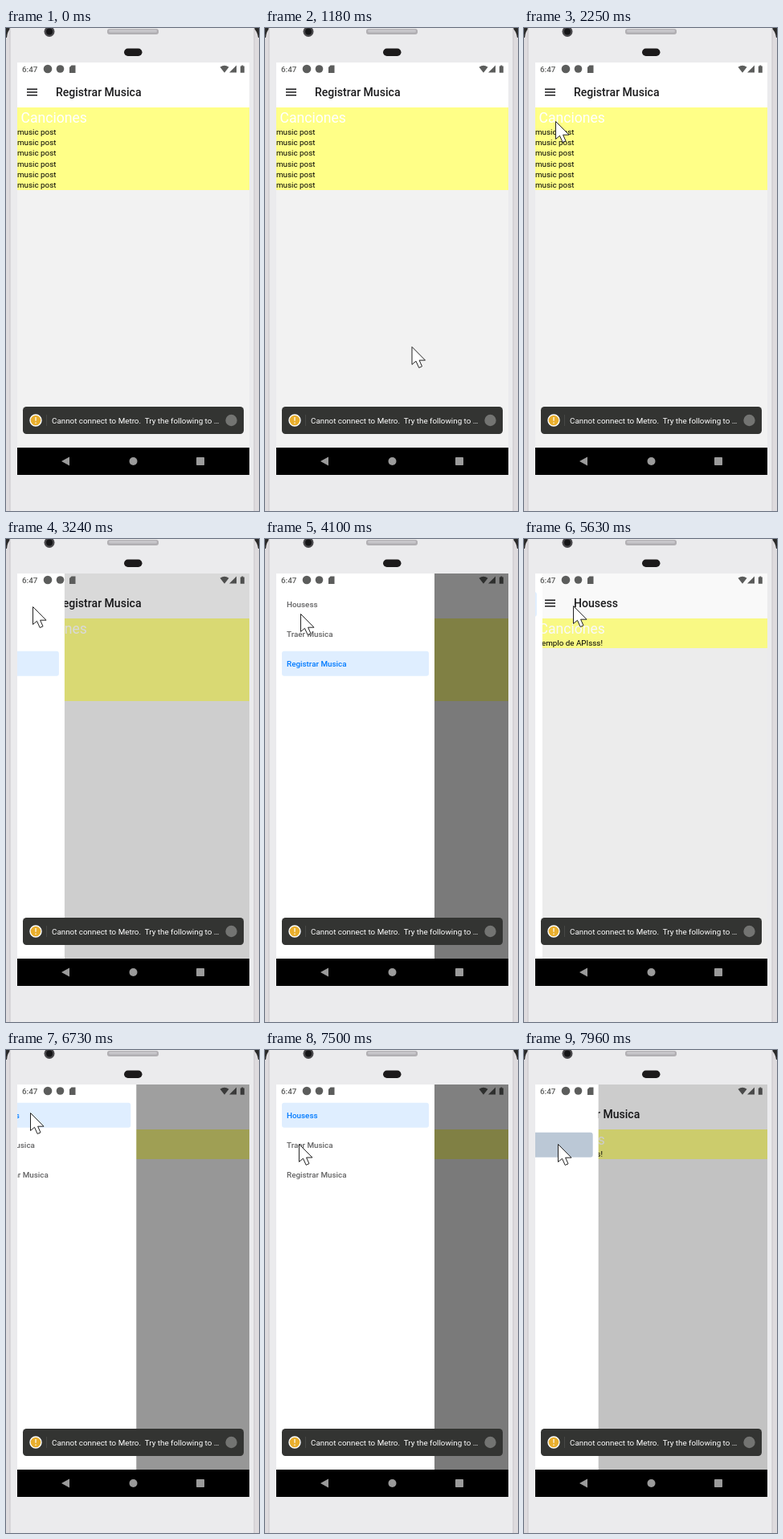
Write an HTML page that moves like this. It is 315x602 px and loops after 8 s.

```html
<!DOCTYPE html>
<html lang="es">
<head>
<meta charset="utf-8">
<title>Drawer navigation</title>
<style>
  html, body { margin: 0; width: 100%; height: 100%; overflow: hidden; background: #e9e9eb; }
  svg { display: block; width: 100%; height: 100%; }
  text { font-family: Roboto, sans-serif; font-size: 9.84px; white-space: pre; }
  .medium { font-weight: 500; }
  .title { font-size: 14.06px; }
  .heading { font-size: 17.58px; }
</style>
</head>
<body>
<svg viewBox="0 0 315 602">
  <defs>
    <clipPath id="screenClip"><rect x="14" y="43" width="289" height="480"/></clipPath>
    <clipPath id="itemClip"><rect id="itemClipRect" x="21" width="183" height="31" rx="3"/></clipPath>
  </defs>

  <!-- phone body -->
  <rect width="315" height="602" fill="#dedbde"/>
  <path d="M0 0H6Q1.500 4 1 12H0ZM315 0H308Q313 4 314 12H315Z" fill="#2a2a2a"/>
  <rect x="5" y="-8" width="304" height="618" rx="8" fill="#ebebed" stroke="#c8c5c9"/>
  <circle cx="54" cy="4.500" r="6.500" fill="#48474a"/>
  <circle cx="54" cy="4.500" r="4" fill="#151517"/>
  <rect x="126" y="1" width="64" height="7" rx="3" fill="#b1afb3"/>
  <rect x="128" y="2" width="60" height="3.500" rx="1.700" fill="#c6c5c9"/>
  <rect x="147" y="25.500" width="22.500" height="9.500" rx="4.750" fill="#1c1a1b"/>

  <g clip-path="url(#screenClip)">
    <!-- page -->
    <rect x="14" y="43" width="289" height="480" fill="#f2f2f2"/>
    <rect x="14" y="43" width="289" height="56" fill="#fff"/>
    <path d="M26 76.200h13M26 80h13M26 83.800h13" stroke="#1c1c1e" stroke-width="1.400"/>
    <text id="title" class="medium title" x="62" y="85" fill="#1c1c1e"></text>
    <rect id="band" x="14" y="99" width="289" fill="#ffff87"/>
    <text class="heading" x="18.500" y="118" fill="#fff">Canciones</text>
    <g id="posts"></g>
    <text id="sample" x="14" y="133">Ejemplo de APIsss!</text>
    <g fill="#5c5d5c">
      <path d="M266.500 48.800Q272 44.600 277.500 48.800L272 55.800Z"/>
      <path d="M287 46.500V55.500H278Z"/>
      <path d="M293.300 46.500h2v1h1.500v8.300h-5v-8.300h1.500Z"/>
    </g>
    <rect id="shade" x="14" y="43" width="289" height="480"/>
    <!-- drawer -->
    <g id="drawer">
      <rect x="14" y="43" width="197" height="480" fill="#fff"/>
      <rect id="activeItem" x="21" width="183" height="31" rx="3" fill="#dfeeff"/>
      <circle id="ripple" clip-path="url(#itemClip)"/>
      <g id="labels"></g>
    </g>
    <g fill="#5c5d5c">
      <text class="medium" x="20" y="55">6:47</text>
      <circle cx="52" cy="51" r="5.300"/>
      <circle cx="67.500" cy="51" r="4.800"/>
      <path d="M81.500 46.500H86.500V56H79V49Z"/>
    </g>
  </g>

  <!-- toast -->
  <rect x="21" y="472" width="275" height="34" rx="4.500" fill="#333432"/>
  <circle cx="37" cy="489" r="7" fill="#e9ae2c" stroke="#fff" stroke-width="1.400"/>
  <path d="M37 485v4.800M37 491.500v1.500" stroke="#fff" stroke-width="1.200"/>
  <path d="M50.500 482v14" stroke="#4c4d4b" stroke-width=".8"/>
  <text x="57" y="493" fill="#fff">Cannot connect to Metro.  Try the following to …</text>
  <circle cx="280.500" cy="489" r="7.200" fill="#737472"/>

  <!-- navigation bar -->
  <rect x="14" y="523" width="289" height="34"/>
  <g fill="#9b9b9b">
    <path d="M69 540L79 534.500V545.500Z"/>
    <circle cx="158.500" cy="540" r="5"/>
    <rect x="237" y="535" width="10" height="10" rx=".8"/>
  </g>

  <g id="pointer">
    <circle id="click" r="18" fill="#ff0" fill-opacity=".47"/>
    <path d="M.5 .5V22.500L5.500 18.300L9.200 26.500L13 24.800L9.600 17.200H17Z" fill="#fff" stroke="#222"/>
  </g>
</svg>
<script>
const LOOP = 8000, STEP = 77.07, FIRST = 870;
const DRAWER_W = 197, SPRING = 18.5;
const RIPPLE_FADE = 190;
const NAMES = ['Housess', 'Traer Musica', 'Registrar Musica'];

// Each tap opens the drawer or picks an item, which closes it
const TAPS = [
  { press: 2790, slide: 3200 },
  { press: 5170, slide: 5385, item: 0 },
  { press: 6340, slide: 6581 },
  { press: 7650, slide: 7851, item: 1 }
];

// Pointer moves: start, end, x, y
const ENTRY = [270, 564];
const MOVES = [
  [870, 1180, 182, 396], [1333, 1630, 76, 219], [1773, 2257, 39, 116],
  [2257, 2640, 33, 84], [3800, 4107, 44, 93], [4107, 4900, 61, 83],
  [5700, 6110, 30, 78], [7000, 7500, 42, 117]
];

const $ = id => document.getElementById(id);
const set = (el, attrs) => { for (const k in attrs) el.setAttribute(k, attrs[k]); };
const show = (id, on) => { $(id).style.display = on ? '' : 'none'; };
const clamp = v => Math.max(0, Math.min(1, v));
const itemY = i => 65.8 + 37 * i;

function addText(parent, attrs, text) {
  const el = document.createElementNS('http://www.w3.org/2000/svg', 'text');
  set(el, attrs);
  el.textContent = text;
  return parent.appendChild(el);
}

for (let i = 0; i < 6; i++) addText($('posts'), { x: 14, y: 133 + 13.2 * i }, 'music post');
const labels = NAMES.map((name, i) =>
  addText($('labels'), { x: 27, y: itemY(i) + 19.5, class: 'medium' }, name));

// The screen refreshes about 13 times a second
const refresh = t => Math.max(0, FIRST + STEP * Math.floor((t - FIRST) / STEP + 0.3));

function pointerAt(t) {
  let [x, y] = ENTRY;
  for (const [start, end, toX, toY] of MOVES) {
    const k = clamp((t - start) / (end - start));
    x += (toX - x) * k;
    y += (toY - y) * k;
  }
  return [x, y];
}

// Critically damped spring
function drawerAt(t) {
  const tap = TAPS.findLast(tap => tap.slide <= t);
  if (!tap) return 0;
  const u = (t - tap.slide) / 1000 * SPRING;
  const left = (1 + u) * Math.exp(-u);
  return 'item' in tap ? left : 1 - left;
}

function drawRipple(t, x, y) {
  const tap = TAPS.find(({ press, slide, item }) =>
    item !== undefined && t >= press && t < slide + RIPPLE_FADE);
  show('ripple', tap);
  if (!tap) return;
  const grow = clamp((t - tap.press) / (tap.slide - tap.press));
  const fade = clamp((tap.slide + RIPPLE_FADE - t) / 160);
  set($('itemClipRect'), { y: itemY(tap.item) });
  set($('ripple'), { cx: x, cy: y, r: 10 + 190 * grow, 'fill-opacity': 0.32 * fade });
}

function draw(now) {
  const t = refresh(now);
  const picked = TAPS.findLast(tap => 'item' in tap && tap.slide <= t);
  const active = picked ? picked.item : 2;
  const open = drawerAt(t);
  const offset = (open - 1) * DRAWER_W;
  const [x, y] = pointerAt(t);

  $('title').textContent = NAMES[active];
  set($('band'), { height: picked ? 37 : 103 });
  show('posts', !picked);
  show('sample', picked);
  set($('shade'), { 'fill-opacity': open / 2 });
  set($('drawer'), { transform: `translate(${offset} 0)` });
  set($('activeItem'), { y: itemY(active) });
  labels.forEach((el, i) => set(el, { fill: i === active ? '#007aff' : '#636364' }));
  drawRipple(t, x - offset, y);

  show('pointer', t >= FIRST);
  set($('pointer'), { transform: `translate(${x} ${y})` });
  show('click', TAPS.some(({ press }) => Math.abs(t - press - STEP / 2) < STEP / 2 + 5));
}

function tick() {
  draw(performance.now() % LOOP);
  requestAnimationFrame(tick);
}
tick();
</script>
</body>
</html>
```
